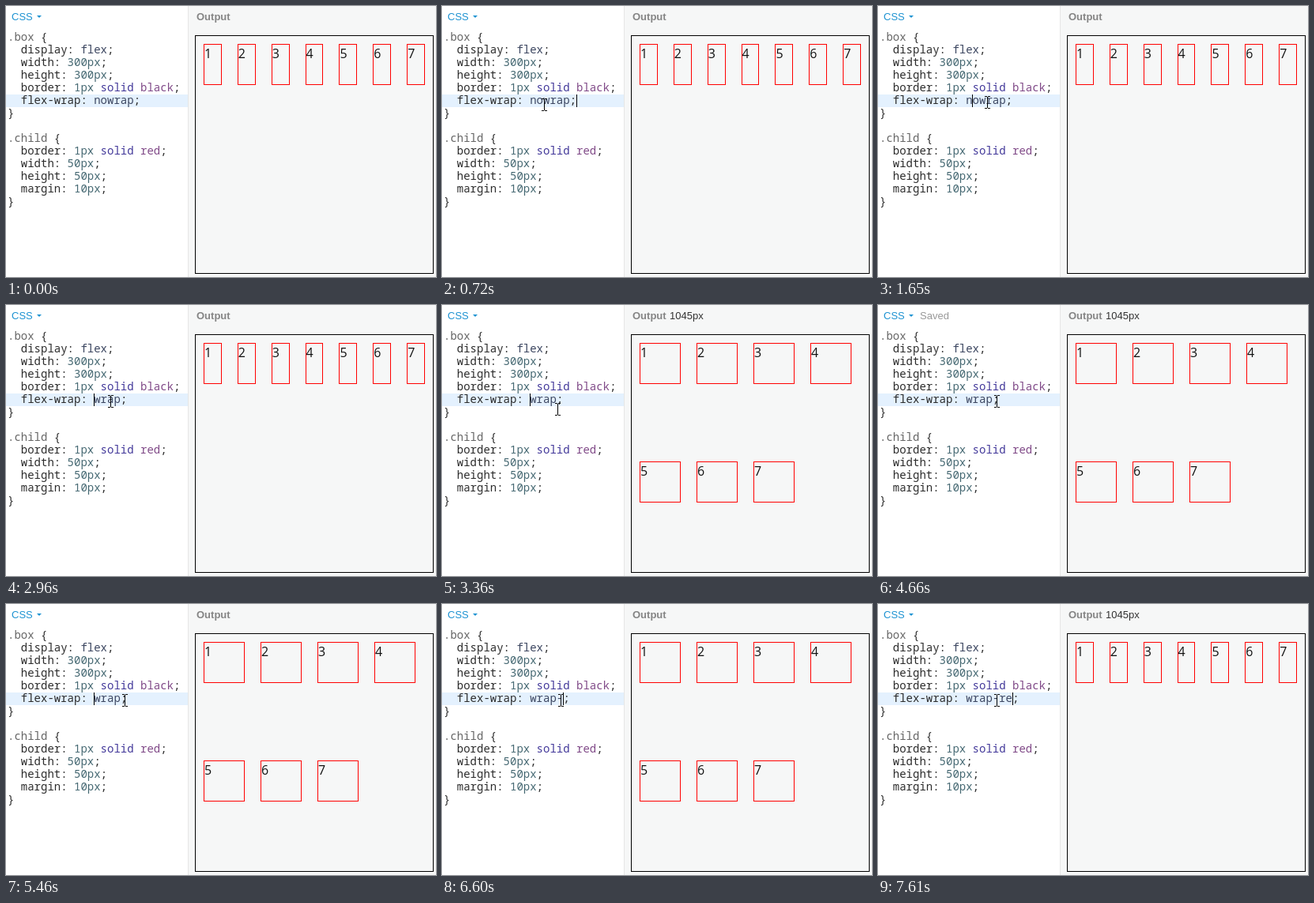
An HTML page for the animation above (8000 ms loop, 544 px wide and 343 px high).

```html
<!DOCTYPE html>
<html lang="en">
<head>
<meta charset="utf-8">
<title>flex-wrap demo</title>
<style>
html, body { margin: 0; width: 100%; height: 100%; overflow: hidden; background: #fff; }
#stage { position: relative; width: 544px; height: 343px; overflow: hidden; background: #fff; }
#stage > * { position: absolute; }
.label { top: 6px; font: 13px/15px "Liberation Sans", Arial, sans-serif; white-space: pre; }
#css { left: 7px; color: #1e93d2; }
#arrow { left: 39px; top: 12px; border: solid transparent; border-width: 3px 3px 0; border-top-color: #1e93d2; }
#saved { left: 53px; color: #999; }
#line { left: 0; top: 112px; width: 230px; height: 16px; background: #e4f1fe; }
#code { left: 2px; top: 31px; margin: 0; font: 300 14px/16px "Noto Sans Mono", "DejaVu Sans Mono", monospace; color: #2c2c2c; }
#code .q { color: #666; }
#code .n { color: #456872; }
#code .a { color: #43399a; }
#code .k { color: #804a88; }
#code .v { color: #3c4660; }
#caret { top: 112px; width: 1px; height: 16px; background: #000; }
#panel { left: 230px; top: 0; width: 313px; height: 343px; background: #f6f7f7; border-left: 1px solid #e6e6e6; }
#output { left: 241px; color: #858585; font-weight: bold; }
#size { left: 288px; color: #333; }
#box { left: 239px; top: 37px; display: flex; width: 300px; height: 300px; border: 1px solid #000; }
#box div { width: 50px; height: 50px; margin: 10px; border: 1px solid #f00; font: 16px/22px "Open Sans", "Noto Sans", sans-serif; color: #111; }
#mouse { left: 0; top: 0; }
</style>
</head>
<body>
<div id="stage">
  <div id="css" class="label">CSS</div>
  <div id="arrow"></div>
  <div id="saved" class="label">Saved</div>
  <div id="line"></div>
  <pre id="code"><span class="q">.box</span> {
  display: <span class="v">flex</span>;
  width: <span class="n">300px</span>;
  height: <span class="n">300px</span>;
  border: <span class="n">1px</span> <span class="a">solid</span> <span class="k">black</span>;
  flex-wrap: <span class="v" id="value">nowrap</span>;
}

<span class="q">.child</span> {
  border: <span class="n">1px</span> <span class="a">solid</span> <span class="k">red</span>;
  width: <span class="n">50px</span>;
  height: <span class="n">50px</span>;
  margin: <span class="n">10px</span>;
}</pre>
  <div id="caret"></div>
  <div id="panel"></div>
  <div id="output" class="label">Output</div>
  <div id="size" class="label">1045px</div>
  <div id="box"><div>1</div><div>2</div><div>3</div><div>4</div><div>5</div><div>6</div><div>7</div></div>
  <svg id="mouse" width="9" height="16" shape-rendering="crispEdges">
    <path d="M1 0h3v1h1v-1h3v1h-3v14h3v1h-3v-1h-1v1h-3v-1h3v-14h-3z"/>
  </svg>
</div>
<script>
const LOOP = 8000, BLINK = 530, CLICK_WAIT = 230, RENDER_WAIT = 310, SIZE_SHOWN = 2130;
const el = id => document.getElementById(id);
const clamp = v => Math.min(1, Math.max(0, v));
const mix = (a, b, p) => a + (b - a) * p;

// A number is a click at that column, a string is a key.
const actions = [
  [960, 1], [1800, 3], [2580, 2], [2810, "Backspace"], [2960, "Backspace"],
  [5540, 4], [6600, "-"], [7530, "r"], [7610, "e"]
];

// Pointer moves: begin, end, x, y.
const moves = [
  [0, 490, 133, 140], [570, 790, 128, 121], [1270, 1420, 138, 122], [1660, 1800, 136, 122],
  [2280, 2580, 132, 122], [3060, 3360, 146, 132], [3960, 4660, 150, 122]
];

// Replays the actions up to time t.
function editorAt(t) {
  const ed = { word: "nowrap", col: 7, blinkFrom: 410, edited: -LOOP };
  for (const [time, act] of actions) {
    if (time > t) break;
    if (typeof act === "number") {
      ed.col = act;
      ed.blinkFrom = time + CLICK_WAIT;
      continue;
    }
    const erase = act === "Backspace", { word, col } = ed;
    ed.word = word.slice(0, erase ? col - 1 : col) + (erase ? "" : act) + word.slice(col);
    ed.col += erase ? -1 : 1;
    ed.blinkFrom = ed.edited = time;
  }
  return ed;
}

const layoutAt = t => editorAt(t - RENDER_WAIT).word === "wrap" ? "wrap" : "nowrap";

function mouseAt(t) {
  let x = 150, y = 360;
  for (const [from, to, nx, ny] of moves) {
    const p = clamp((t - from) / (to - from)), eased = p * p * (3 - 2 * p);
    x = mix(x, nx, eased);
    y = mix(y, ny, eased);
  }
  return [Math.round(x), Math.round(y)];
}

const start = performance.now();

function draw(now) {
  const t = Math.max(0, now - start) % LOOP;
  const ed = editorAt(t), layout = layoutAt(t), [x, y] = mouseAt(t);
  const idle = t - ed.edited, shown = t - ed.blinkFrom;
  if (el("value").textContent !== ed.word) el("value").textContent = ed.word;
  el("box").style.flexWrap = layout;
  el("size").style.opacity = layout === layoutAt(t - SIZE_SHOWN) ? 0 : 1;
  el("saved").style.opacity = clamp((idle - 900) / 400) * clamp((2430 - idle) / 200);
  el("caret").style.opacity = shown >= 0 && shown % (2 * BLINK) < BLINK ? 1 : 0;
  el("caret").style.left = Math.round(110.9 + 8.4 * ed.col) + "px";
  el("mouse").style.transform = `translate(${x - 4}px, ${y - 8}px)`;
  requestAnimationFrame(draw);
}
draw(start);
</script>
</body>
</html>
```
